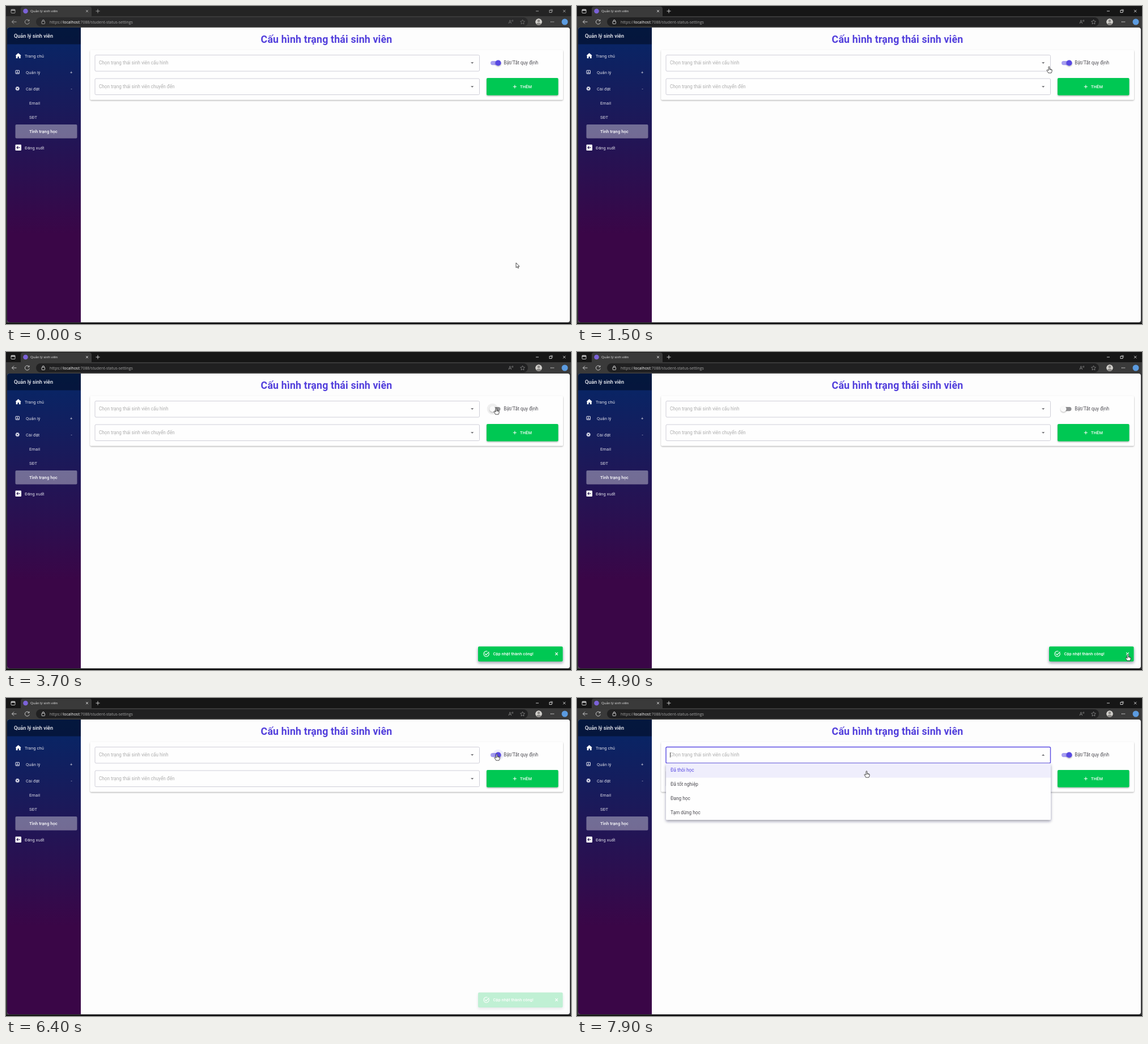
An HTML page that plays this animation: 997 by 561 pixels, repeating every 8 s.

```html
<!DOCTYPE html>
<html lang="vi">
<head>
<meta charset="utf-8">
<title>Cấu hình trạng thái sinh viên</title>
<style>
html, body { margin: 0; width: 100%; height: 100%; overflow: hidden; background: #0a0a0a; }
svg { display: block; width: 997px; height: 561px; font-family: Roboto, sans-serif; }
.ui { font-family: "Open Sans", sans-serif; }
.menu { font-size: 7.5px; letter-spacing: .1px; fill: #dcdce6; }
.field { font-size: 8.2px; fill: #aeaeae; }
.item { font-size: 8.25px; fill: #4b4a50; }
.line { fill: none; stroke: #d8d8d8; stroke-width: .9; }
</style>
</head>
<body>
<svg viewBox="0 0 997 561">
  <defs>
    <linearGradient id="side" x1="0" y1="0" x2="0" y2="1">
      <stop offset="0" stop-color="#052767"/>
      <stop offset=".7" stop-color="#3a0647"/>
    </linearGradient>
    <filter id="shadow" x="-5%" y="-20%" width="110%" height="150%">
      <feDropShadow dx="0" dy="1.2" stdDeviation="1.1" flood-color="#000" flood-opacity=".34"/>
    </filter>
    <filter id="deep" x="-5%" y="-20%" width="110%" height="150%">
      <feDropShadow dx="0" dy="2.6" stdDeviation="2.4" flood-color="#1a1840" flood-opacity=".42"/>
    </filter>
    <clipPath id="face"><circle cx="940" cy="28" r="6"/></clipPath>
  </defs>

  <!-- browser -->
  <rect id="tabBar" width="997" height="40"/>
  <path d="M0 18H26V5q0-4 4-4H147q4 0 4 4V18H997V45H0z" fill="#3a3a3a"/>
  <rect id="address" x="53" y="20" width="868" height="16" rx="8"/>
  <g id="chrome" class="line">
    <rect x="9" y="6" width="7" height="6.5" rx="1"/><path d="M9 7.4h7" stroke-width="1.8"/>
    <path d="M141 7l4 4m0-4l-4 4M158.500 9h7M162 5.500v7"/>
    <path d="M935 9h5M983 6.800l4.400 4.400m0-4.400l-4.400 4.400"/>
    <rect x="959" y="7.500" width="4" height="4"/><path d="M960.500 6.200h3.800v3.800" stroke-width=".6"/>
    <path d="M18.500 28h-8m3.500-3.500L10.500 28l3.500 3.500"/>
    <path d="M40.500 25.500A4 4 0 1 0 41.300 29M41 23.800v2.500h-2.600"/>
    <rect x="63" y="27" width="5.500" height="4.500" rx=".8"/><path d="M64.200 27v-1a1.600 1.600 0 0 1 3.200 0v1"/>
    <g stroke="#999" stroke-width=".7">
      <path d="M911.500 24.200l1.200 2.600 2.800.3-2.100 1.900.6 2.800-2.500-1.400-2.500 1.400.6-2.800-2.100-1.900 2.800-.3z"/>
      <path d="M887 31l2.400-6.200 2.400 6.200M887.900 29h3M892.500 25q.9 1 0 2M893.900 24.200q1.500 1.800 0 3.600"/>
    </g>
    <path d="M961 28h6" stroke-width="1.300" stroke-dasharray="1.300 1.200"/>
  </g>
  <text class="ui" x="43" y="11.200" font-size="6.050" fill="#e8e8e8">Quản lý sinh viên</text>
  <text class="ui" x="77" y="30.500" font-size="6.930" fill="#a4a4a4">https://<tspan fill="#fff">localhost</tspan>:7088/student-status-settings</text>
  <circle cx="34.500" cy="9" r="4.300" fill="#7b62d8"/>
  <circle cx="986" cy="28" r="5.500" fill="#5b9be0"/>
  <g clip-path="url(#face)">
    <circle cx="940" cy="28" r="6" fill="#d2d0cc"/>
    <circle cx="940" cy="26.300" r="2.300" fill="#8b8986"/><ellipse cx="940" cy="33" rx="4.400" ry="3.600" fill="#8b8986"/>
  </g>

  <!-- page -->
  <rect y="38" width="997" height="523" fill="#323234"/>
  <rect y="559.500" width="997" height="1.500" fill="#080808"/>
  <rect x="2" y="38" width="993" height="520" rx="4" fill="#fdfdfd"/>
  <path d="M6 38H132V558H6q-4 0-4-4V42q0-4 4-4z" fill="url(#side)"/>
  <path d="M6 38H132V67.500H2V42q0-4 4-4z" fill="#000" fill-opacity=".4"/>
  <text x="14" y="55.500" font-size="9.150" font-weight="500" fill="#f4f4f8">Quản lý sinh viên</text>
  <rect x="16.500" y="209" width="109" height="24.500" rx="2" fill="#fff" fill-opacity=".37"/>
  <g class="menu">
    <text x="33" y="90.500">Trang chủ</text>
    <text x="35" y="119.500">Quản lý</text><text x="113" y="119.500">+</text>
    <text x="35" y="148.500">Cài đặt</text><text x="114.500" y="148.500">-</text>
    <text x="41" y="173.500">Email</text>
    <text x="41" y="198.500">SĐT</text>
    <text x="41" y="223.500" font-weight="500" fill="#fff">Tình trạng học</text>
    <text x="33" y="252.500">Đăng xuất</text>
  </g>
  <path d="M21.700 83l5.200 4.600h-1.200V92.300h-2.800v-3h-2.400v3h-2.800V87.600h-1.200z" fill="#fff"/>
  <g fill="none" stroke="#e6e6f0">
    <rect x="17" y="113.500" width="6.500" height="6" rx=".6"/>
    <path d="M18.500 118.300q1.800-2.600 3.600 0M20.200 114.700v1.700" stroke-width="1.200"/>
    <circle cx="20.200" cy="145.700" r="2" stroke-width="1.700"/>
    <circle cx="20.200" cy="145.700" r="3.300" stroke-dasharray="1.300 1.290" stroke-width="1.100"/>
  </g>
  <rect x="16.500" y="244.500" width="10.500" height="10.500" rx="1.200" fill="#fff"/>
  <path d="M24.800 249.800h-5.800m2.400-2.300l-2.400 2.300 2.400 2.300" fill="none" stroke="#27164f" stroke-width="1.100"/>

  <text x="565.500" y="64.800" text-anchor="middle" font-size="17.850" font-weight="700" letter-spacing=".13" fill="#523fdc">Cấu hình trạng thái sinh viên</text>
  <rect x="148.500" y="77.500" width="834.500" height="88" rx="2" fill="#fefefe" filter="url(#shadow)"/>
  <g fill="none" stroke="#cfced8">
    <rect id="field" x="157" y="86.500" width="678.500" height="28.500" rx="2"/>
    <rect x="157" y="128" width="678.500" height="28.500" rx="2"/>
  </g>
  <text class="field" x="164" y="103.300">Chọn trạng thái sinh viên cấu hình</text>
  <text class="field" x="164" y="144.800">Chọn trạng thái sinh viên chuyển đến</text>
  <path id="chevron" d="M-2.600-1.300h5.200L0 1.300z" fill="#646469"/>
  <path d="M820.100 141.200h5.200L822.700 143.800z" fill="#646469"/>
  <path id="caret" d="M164.500 96v9" stroke="#333" stroke-width=".8"/>

  <rect id="track" x="855" y="97" width="17.500" height="7.200" rx="3.600"/>
  <circle id="halo" cy="100.500" r="9.800"/>
  <circle id="knob" cy="100.500" r="5.100" filter="url(#shadow)"/>
  <text class="item" x="878.300" y="103.300">Bật/Tắt quy định</text>
  <rect x="848" y="127" width="126.500" height="30.500" rx="2" fill="#00c853" filter="url(#shadow)"/>
  <path d="M894.800 142.300h6M897.800 139.300v6" stroke="#fff"/>
  <text x="907" y="144.700" font-size="7.270" font-weight="500" letter-spacing=".25" fill="#fff">THÊM</text>

  <g id="list">
    <rect x="157" y="115.500" width="679" height="99.500" rx="2" fill="#fefefe" filter="url(#deep)"/>
    <rect x="157" y="115.500" width="679" height="25" fill="#efeefc"/>
    <g class="item">
      <text x="165" y="130.300" style="fill:#594ae2">Đã thôi học</text>
      <text x="165" y="155.300">Đã tốt nghiệp</text>
      <text x="165" y="180.300">Đang học</text>
      <text x="165" y="205.300">Tạm dừng học</text>
    </g>
  </g>

  <g id="toast">
    <rect x="833" y="519.500" width="149.500" height="26.500" rx="2" fill="#00c853" filter="url(#deep)"/>
    <path d="M852 530.800A4.700 4.700 0 1 1 849.500 528.200M844.800 532.200l2.300 2.300 5.300-5.600M969.200 530.200l4.600 4.600m0-4.600l-4.600 4.600" fill="none" stroke="#fff" stroke-width="1.100"/>
    <text x="859.500" y="535.300" font-size="7.400" font-weight="500" letter-spacing=".05" fill="#fff">Cập nhật thành công!</text>
  </g>

  <g id="pointers" stroke-linejoin="round" stroke="#222" stroke-width=".8">
    <path id="arrow" d="M0 0V8.600L2 6.800 3.400 9.700 4.700 9.100 3.400 6.300H6z" fill="#fff"/>
    <path id="hand" fill="#fff" d="M-1 1Q0-.6 1 1V4.600Q2.200 4 2.700 5.100Q3.900 4.600 4.200 5.700Q5.300 5.600 5.300 6.800Q5.300 9.300 4 11.600H-1.300Q-2.200 9.500-4 7.200Q-4.100 5.800-2.600 6.300L-1 7.500zM1 4.600V6.200M2.700 5.100V6.600M4.200 5.700V7"/>
    <path id="beam" fill="none" d="M-2.500-5Q0-5 0-3.800Q0-5 2.500-5M0-4V4M-2.500 5Q0 5 0 3.800Q0 5 2.500 5"/>
  </g>
</svg>
<script>
const LOOP = 8000;
const $ = id => document.getElementById(id);
const set = (id, attrs) => {
  for (const name in attrs) $(id).setAttribute(name, attrs[name]);
};
const clamp = v => Math.min(1, Math.max(0, v));
const ramp = (t, from, to) => clamp((t - from) / (to - from));
const ease = v => v * v * (3 - 2 * v);

// time, x, y of the pointer's hot spot
const path = [
  [0, 900, 453], [600, 900, 453], [1000, 848, 300], [1500, 833, 106.500],
  [1800, 865, 98.500], [3700, 865, 98.500], [4450, 972, 533], [4950, 972, 533],
  [5400, 900, 132], [5700, 876, 102.500], [5900, 866, 98.500], [6450, 866, 98.500],
  [7200, 587, 110], [7450, 560, 106], [7850, 511, 128.500], [LOOP, 511, 128.500]
];
const pointerKinds = [
  [0, "arrow"], [1400, "hand"], [3800, "arrow"], [4400, "hand"], [5050, "arrow"],
  [5350, "hand"], [6600, "beam"], [7550, "hand"]
];

function pointerAt(t) {
  const i = path.findIndex(p => p[0] > t);
  const [a, b] = [path[i - 1], path[i]];
  const k = ease(ramp(t, a[0], b[0]));
  return [a[1] + (b[1] - a[1]) * k, a[2] + (b[2] - a[2]) * k];
}

function draw(t) {
  const focused = t >= 300;
  set("tabBar", { fill: focused ? "#161616" : "#242424" });
  set("address", { fill: focused ? "#202021" : "#2a2a2b" });
  set("chrome", { opacity: focused ? 1 : .75 });

  const on = 1 - ramp(t, 2500, 2650) + ramp(t, 5950, 6100);
  const knobX = 858.500 + 10 * ease(on);
  const lit = on > .5;
  const hover = (t > 1750 && t < 3750) || (t > 5850 && t < 6500);
  set("track", { fill: lit ? "#a69ef0" : "#909092" });
  set("knob", { cx: knobX, fill: lit ? "#594ae2" : "#fafafa" });
  set("halo", { cx: knobX, fill: lit ? "#594ae2" : "#555", opacity: hover ? .09 : 0 });

  set("toast", { opacity: t < 4800 ? ramp(t, 2750, 3650) : 1 - ramp(t, 4950, 6850) });

  const open = t >= 7450;
  set("field", { stroke: open ? "#594ae2" : "#cfced8", "stroke-width": open ? 1.400 : 1 });
  set("chevron", { transform: `translate(822.700 100.500) scale(1 ${open ? -1 : 1})` });
  set("caret", { opacity: open ? 1 : 0 });
  set("list", { opacity: ramp(t, 7450, 7650) });

  const kind = pointerKinds.filter(k => k[0] <= t).pop()[1];
  for (const id of ["arrow", "hand", "beam"]) set(id, { visibility: id === kind ? "visible" : "hidden" });
  set("pointers", { transform: `translate(${pointerAt(t)})` });
}

const start = performance.now();
function tick() {
  draw((performance.now() - start) % LOOP);
  requestAnimationFrame(tick);
}
tick();
</script>
</body>
</html>
```
